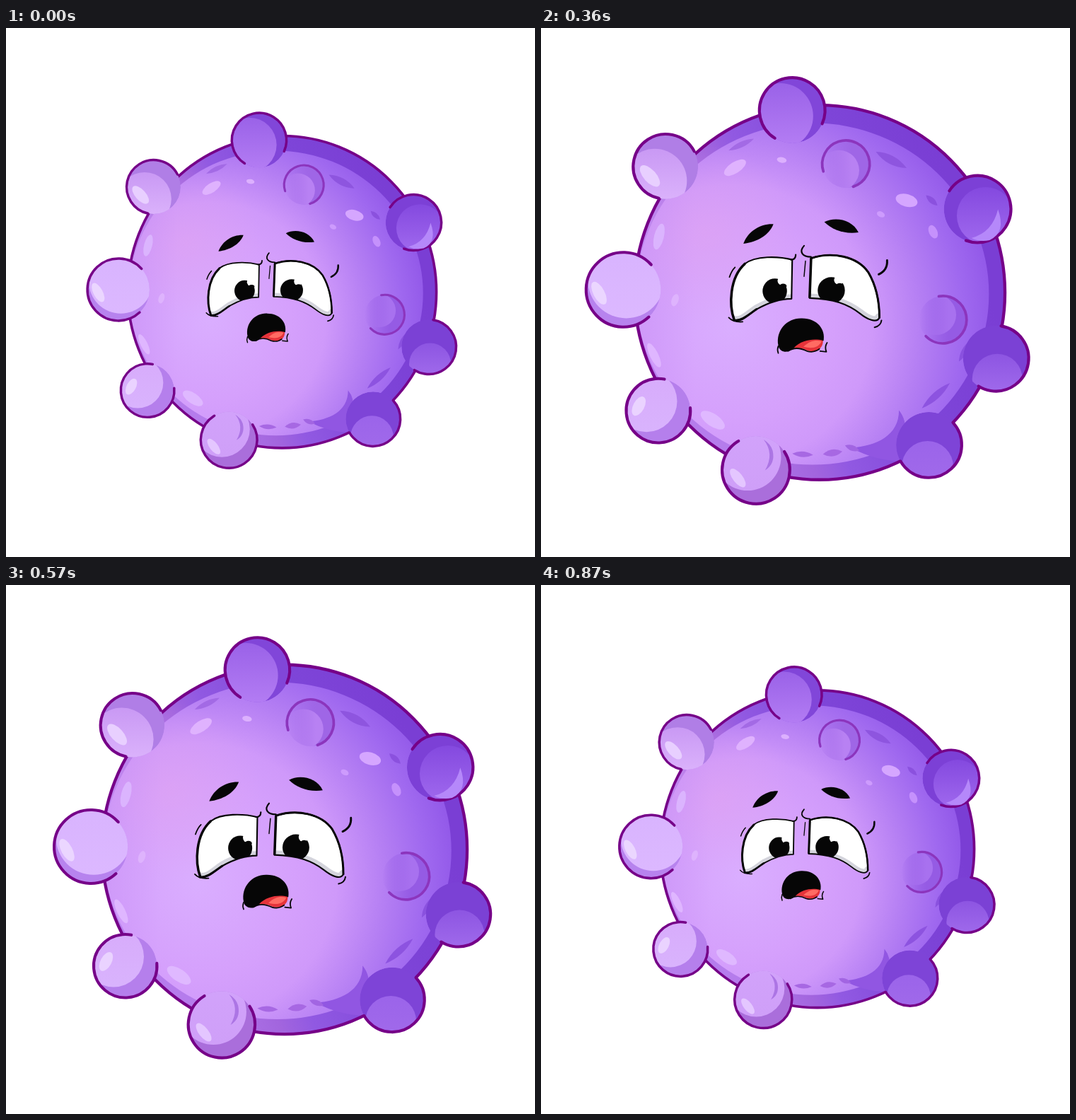
An HTML page with a canvas that plays this animation: 748 px wide and 748 px high, repeating every 0.9 s.

```html
<!DOCTYPE html>
<html lang="en">
<head>
<meta charset="utf-8">
<title>Pulsing germ</title>
<style>
html, body { margin: 0; width: 748px; height: 748px; overflow: hidden; background: #fff; }
canvas { display: block; }
</style>
</head>
<body>
<canvas id="stage" width="748" height="748"></canvas>
<script>
const ctx = document.getElementById('stage').getContext('2d');
const LOOP = 900, STEP = 30, PEAK = 0.25, DRAWN_AT = 1.2167;
const CENTER = [371.5, 369.7];
const OUTLINE = '#760088', INK = '#060606';
const rad = deg => deg * Math.PI / 180;

function addStops(gradient, stops) {
  stops.forEach(([at, color]) => gradient.addColorStop(at, color));
  return gradient;
}
const linear = (x0, y0, x1, y1, ...stops) => addStops(ctx.createLinearGradient(x0, y0, x1, y1), stops);
const radial = (x, y, r, ...stops) => addStops(ctx.createRadialGradient(x, y, 0, x, y, r), stops);

function ellipse(x, y, rx, ry, fill, deg = 0) {
  ctx.beginPath();
  ctx.ellipse(x, y, rx, ry, rad(deg), 0, 7);
  ctx.fillStyle = fill;
  ctx.fill();
}

function fill(d, color) {
  ctx.fillStyle = color;
  ctx.fill(new Path2D(d));
}

function line(d, width, color = INK) {
  ctx.strokeStyle = color;
  ctx.lineWidth = width;
  ctx.stroke(new Path2D(d));
}

// Pointed oval
function leaf(x, y, rx, ry, deg, color) {
  ctx.save();
  ctx.translate(x, y);
  ctx.rotate(rad(deg));
  fill(`M${-rx},0 Q0,${-2 * ry} ${rx},0 Q0,${2 * ry} ${-rx},0`, color);
  ctx.restore();
}

function arc(x, y, r, from, to, width, color) {
  ctx.beginPath();
  ctx.arc(x, y, r, rad(from), rad(to));
  ctx.strokeStyle = color;
  ctx.lineWidth = width;
  ctx.stroke();
}

// Round knob: shaded disc, a lit disc clipped inside it, and an open outline
function knob({ at: [x, y, r], open: [from, to], shade, lit: [lx, ly, lr, top, bottom], shine }) {
  ctx.save();
  ctx.beginPath();
  ctx.arc(x, y, r, 0, 7);
  ctx.clip();
  ellipse(x, y, r, r, shade);
  ellipse(lx, ly, lr, lr, linear(lx, ly - lr, lx, ly + lr, [0, top], [1, bottom]));
  if (shine) ellipse(...shine);
  ctx.restore();
  arc(x, y, r, from, to, 4.2, OUTLINE);
}

// Knob facing the viewer, fading into the body on its left side
function facingKnob(x, y, from, to, shade, lit) {
  const r = 34, [lx, ly, lr] = [x - 10, y + (from > 0 ? 9 : -7), 29];
  ctx.save();
  ctx.beginPath();
  ctx.arc(x, y, r, 0, 7);
  ctx.clip();
  ellipse(x, y, r, r, linear(x - r, y, x + 8, y, [0, shade + '00'], [1, shade]));
  ellipse(lx, ly, lr, lr, linear(x - r, y, x + 8, y, [0, lit + '00'], [1, lit]));
  ctx.restore();
  arc(x, y, r, from, to, 3.8, '#8c35bd');
}

const knobs = [
  { at: [355, 113, 47], open: [122, 384], shade: '#8146d9', lit: [338, 121, 47, '#9a62e8', '#b57ef4'] },
  { at: [173.5, 193.5, 46.5], open: [102, 332], shade: '#b07ee6', lit: [158, 214, 46, '#c999f4', '#dfb8fd'],
    shine: [151, 207, 9, 19, '#e8cfff', -42] },
  { at: [113, 370, 53.5], open: [47, 318], shade: '#b783ee', lit: [117, 356, 55, '#d8b3fe', '#dcb8ff'],
    shine: [78, 375, 8, 18, '#ebd6ff', -28] },
  { at: [163, 543.5, 46], open: [-5, 281], shade: '#b57fec', lit: [146, 530, 44, '#d7abfb', '#d9b3fd'],
    shine: [135, 537, 8, 15, '#ead3ff', 28] },
  { at: [303, 628.5, 48.5], open: [-33, 239], shade: '#aa6edb', lit: [291, 610, 48, '#d2a3fb', '#cf9ff8'],
    shine: [277, 640, 7, 16, '#e4c6ff', -38] },
  { at: [620.5, 254.5, 48], open: [213, 470], shade: '#7c40d6', lit: [632, 264, 41, '#8449df', '#a069ee'] },
  { at: [647, 468.5, 47], open: [-81, 122], shade: '#7b41d5', lit: [649, 498, 36, '#8d55e2', '#a570ee'] },
  { at: [551, 592.5, 47], open: [-43, 150], shade: '#7e44d7', lit: [549, 624, 37, '#9b64ea', '#a26bea'] }
];

const darkSpots = [
  [282, 162, 20, 4, -25, '#a36ae5'], [497, 184, 25, 6, 28, '#8e55df'],
  [555, 242, 11, 4, 42, '#8b51de'], [602, 458, 17, 4, -62, '#8a51df'],
  [561, 522, 27, 5, -42, '#8d53e0'], [370, 606, 15, 4, 4, '#a768e3'],
  [413, 604, 14, 5, -8, '#a768e3'], [441, 597, 11, 4, 20, '#a265e2']
];

const lightSpots = [
  [273, 195, 18, 8, -33, '#dfb2fe'], [340, 184, 7, 4, 10, '#dcb0fe'],
  [519, 242, 16, 9, 16, '#d5a6ff'], [482, 262, 6, 4, 25, '#cd9bfd'],
  [557, 287, 10, 6, 65, '#c591fc'], [164, 294, 19, 7, 104, '#dbb4fe'],
  [187, 385, 9, 5, 108, '#deb3fd'], [157, 464, 19, 6, 64, '#dfb6ff'],
  [241, 557, 20, 9, 34, '#dfb8ff']
];

function drawBody() {
  const body = new Path2D();
  body.ellipse(394.5, 374, 265.5, 268.5, 0, 0, 7);
  ctx.save();
  ctx.clip(body);
  ctx.fillStyle = linear(620, 330, 220, 470,
    [0, '#7a3ed4'], [0.32, '#7e45d8'], [0.64, '#9159e2'], [0.75, '#a265de'], [1, '#b57cec']);
  ctx.fill(body);
  ellipse(384, 376, 253, 245, radial(270, 420, 400,
    [0, '#daaeff'], [0.35, '#d5a0fc'], [0.5, '#cf99fa'], [0.68, '#b47ef3'], [0.83, '#9f68ef'], [1, '#8b50e5']));
  ellipse(230, 290, 130, 130, radial(230, 290, 130, [0, '#e0a3f088'], [1, '#e0a3f000']));
  ctx.fillStyle = linear(128, 0, 215, 0, [0, '#c08af255'], [1, '#c08af200']);
  ctx.fill(body);
  fill('M440,597 C475,594 508,580 508,543 Q520,558 516,577 Q540,570 560,560 L520,615 Q480,618 440,597', '#9156e2');
  ctx.restore();
  darkSpots.forEach(spot => leaf(...spot));
  lightSpots.forEach(spot => ellipse(...spot.slice(0, 4), spot[5], spot[4]));
  ctx.strokeStyle = OUTLINE;
  ctx.lineWidth = 4.4;
  ctx.stroke(body);
}

function drawKnobs() {
  knobs.forEach(knob);
  fill('M314,585 Q330,605 316,629 Q331,620 327,601 Q324,591 314,585', '#ac75e4');
  fill('M612,296 Q642,288 650,255 Q662,288 638,299 Q624,302 612,296', '#b588fa');
  facingKnob(432, 190, 162, 432, '#9f66e6', '#b881f3');
  facingKnob(571, 413, -100, 136, '#955be4', '#a871ef');
}

function eye(shape, shadow, [px, py, rx, ry]) {
  ctx.save();
  ctx.clip(new Path2D(shape));
  fill(shape, '#fff');
  line(shadow, 13, '#d4d4dc');
  ellipse(px, py, rx, ry, INK);
  ellipse(px + 11, py - 15, 7, 7, '#fff');
  ellipse(px + 12, py - 7, 5, 3.5, INK);
  ctx.restore();
  line(shape, 2.2);
}

function drawFace() {
  ctx.lineCap = ctx.lineJoin = 'round';
  fill('M285,304 C292,285 311,275 328,276 C322,292 304,302 285,304', INK);
  fill('M401,273 C416,265 441,269 450,288 C430,291 412,284 401,273', INK);

  eye('M272,414 C264,392 265,353 287,333 C302,321 335,322 355,327 L354,383 C336,383 320,389 304,398 C293,405 283,417 272,414Z',
    'M272,414 C283,417 293,405 304,398 C320,389 336,383 354,383', [330, 372, 17.5, 18]);
  line('M272,414 C264,392 265,353 287,333', 3.6);
  line('M272,414 C283,415 293,405 304,398', 3);
  line('M265,352 Q268,343 273,338 M264,410 Q270,417 284,416', 1.8);

  eye('M382,325 C412,315 448,322 464,345 C474,362 480,385 480,410 C476,419 462,412 452,404 C435,391 415,383 380,382Z',
    'M380,382 C415,383 435,391 452,404 C462,412 476,419 480,410', [411, 371, 19.5, 19]);
  line('M382,325 C412,315 448,322 464,345 C474,362 480,385 480,410', 3);
  line('M382,326 L380,381', 3.6);
  line('M479,348 Q492,342 491,328', 3);
  line('M473,424 Q482,422 483,414', 2);

  line('M372,307 C364,316 370,323 382,323 M353,327 Q360,327 360,320', 2.2);
  line('M374,329 L372,351', 1.5);

  fill('M335,450 C331,428 348,410 369,411 C391,411 403,427 400,443 C388,450 368,447 354,456 C348,461 337,460 335,450', INK);
  fill('M357,454 C369,441 388,440 399,443 C400,455 388,461 376,457 C370,454 364,453 357,454', '#e5333a');
  fill('M371,452 C381,442 390,442 397,444 C393,453 384,455 371,452', '#ff6b63');
  line('M349,458 C358,452 368,454 376,458 Q386,461 394,455', 1.8);
  line('M405,446 Q401,452 404,459 L395,458 M335,451 Q333,456 335,461', 1.8);
}

function draw(time) {
  const t = Math.floor(time % LOOP / STEP) * STEP;
  const grow = 1 + PEAK * (1 - Math.abs(1 - 2 * t / LOOP));
  const scale = grow / DRAWN_AT;
  const [x, y] = CENTER;
  ctx.setTransform(1, 0, 0, 1, 0, 0);
  ctx.fillStyle = '#fff';
  ctx.fillRect(0, 0, 748, 748);
  ctx.setTransform(scale, 0, 0, scale, x * (1 - scale), y * (1 - scale));
  drawBody();
  drawKnobs();
  drawFace();
}

const start = performance.now();
function tick() {
  draw(performance.now() - start);
  requestAnimationFrame(tick);
}
tick();
</script>
</body>
</html>
```
